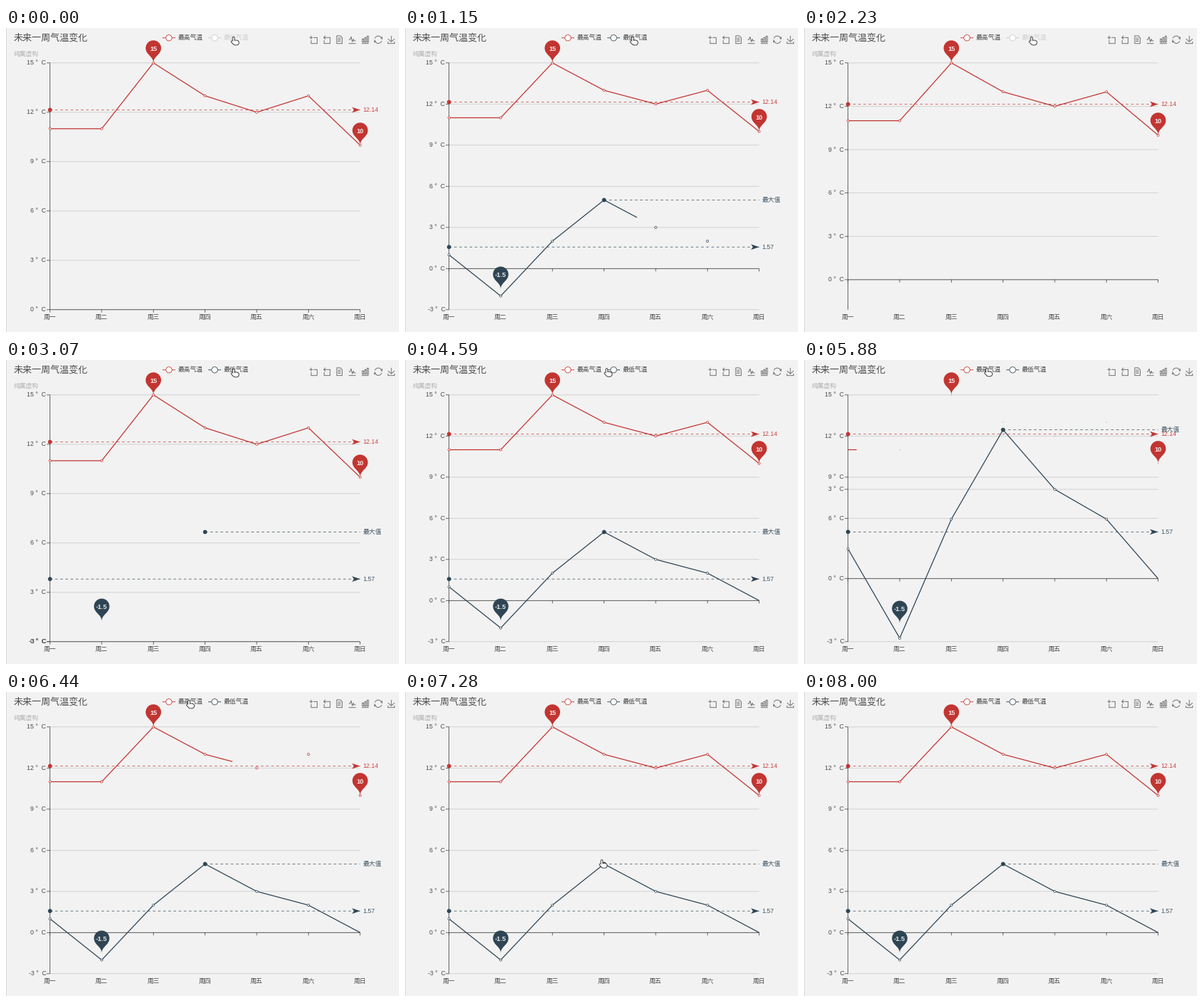
Write a matplotlib script that moves like this. It is 550x425 px and loops after 8.15 s.

```python
import math

import matplotlib.pyplot as plt
import numpy as np
from matplotlib.animation import FuncAnimation
from matplotlib.patches import Circle, Polygon

W, H = 550, 425
LOOP, STEP = 8150, 50
PT = 0.72                      # points per pixel at 100 dpi
BG, INK, RED, NAVY = "#f2f2f2", "#333333", "#c23531", "#2f4554"
OFF, GRID = "#cccccc", "#cccccc"
LEFT, RIGHT, TOP, BOTTOM = 61.6, 495.6, 48.8, 393.8
XS = np.linspace(LEFT, RIGHT, 7)

plt.rcParams["font.family"] = ["Liberation Sans", "Noto Sans CJK JP"]
plt.rcParams["lines.scale_dashes"] = False

# Pins are (column, value)
SERIES = {
    "high": dict(color=RED, data=[11, 11, 15, 13, 12, 13, 10],
                 pins=[(2, 15), (6, 10)], lx=228, name="最高气温"),
    "low": dict(color=NAVY, data=[1, -2, 2, 5, 3, 2, 0],
                pins=[(1, -1.5)], lx=292, name="最低气温"),
}

# Legend clicks: first picture after the click, ms already elapsed, series
CLICKS = [(630, 46, "low"), (2140, 30, "low"), (3070, 0, "low"),
          (5140, 40, "high"), (5880, 28, "high")]

# Pointer: on the second legend item, on the first one, leaving
HAND_A, HAND_B, HAND_C = map(np.array, ((315.5, 12.5), (253, 11.5), (285, 380)))

fig = plt.figure(figsize=(W / 100, H / 100), dpi=100, facecolor=BG)
ax = fig.add_axes([0, 0, 1, 1])
ax.set_xlim(0, W)
ax.set_ylim(H, 0)
ax.axis("off")
drawn = []


def line(points, color, width, dash=None, cap="butt"):
    xs, ys = np.array(points, float).T
    drawn.extend(ax.plot(xs, ys, color=color, lw=width * PT, zorder=1,
                         ls=(0, dash) if dash else "-", snap=False,
                         solid_capstyle=cap, dash_capstyle=cap))


def text(x, y, s, color=INK, size=8.75, ha="left", weight="normal"):
    drawn.append(ax.text(x, y, s, color=color, fontsize=size * PT, ha=ha,
                         va="center", weight=weight, alpha=0.88, zorder=1))


def disc(x, y, r, fill, edge="none", width=0):
    drawn.append(ax.add_patch(Circle((x, y), r, fc=fill, ec=edge,
                                     lw=width * PT, zorder=1)))


def shape(points, fill):
    drawn.append(ax.add_patch(Polygon(points, fc=fill, ec="none", zorder=1)))


def pin_outline(r=10.8, height=36.1):
    """Map pin with its tip at the origin: a round head and two curved sides."""
    dy = r * r / (height - r)
    cy = dy + r - height
    ang = math.asin(dy / r)
    a = np.linspace(math.pi - ang, 2 * math.pi + ang, 40)
    head = np.column_stack([r * np.cos(a), cy + r * np.sin(a)])
    x0, y0 = head[-1]
    x1, y1 = x0 - 0.6 * r * math.sin(ang), y0 + 0.6 * r * math.cos(ang)
    t = np.linspace(0, 1, 14)
    u = 1 - t
    side = np.column_stack([
        u ** 3 * x0 + 3 * u * u * t * x1,
        u ** 3 * y0 + 3 * u * u * t * y1 - 3 * u * t * t * 0.7 * r])
    return np.vstack([head, side, side[::-1] * (-1, 1)])


PIN = pin_outline()


def toolbox():
    """Seven outline icons, each designed on a square from -1 to 1."""
    def box(x, y, w, h):
        return [(x, y), (x + w, y), (x + w, y + h), (x, y + h), (x, y)]

    def row(y, half=0.9):
        return [(-half, y), (half, y)]

    frame = [(0.1, -0.55), (1, -0.55), (1, 1), (-0.55, 1), (-0.55, 0.1)]
    zoom = [frame, [(-1, -0.55), (-0.1, -0.55)], [(-0.55, -1), (-0.55, -0.1)]]
    back = [frame, [(-0.6, -0.55), (0.1, -0.55)],
            [(-0.2, -1), (-0.65, -0.55), (-0.2, -0.1)]]
    page = [[(0.3, -1), (0.75, -0.5), (0.75, 1), (-0.65, 1), (-0.65, -1), (0.3, -1)]]
    page += [row(y, 0.4) for y in (-0.4, 0, 0.4)]
    pulse = [[(-0.9, 0), (-0.6, 0), (-0.3, -0.75), (0, 0.55), (0.3, -0.15),
              (0.4, 0.3), (0.9, 0.3)], row(1)]
    bars = [box(-0.77 + 0.62 * i, -0.2 - 0.36 * i, 0.35, 0.85 + 0.36 * i)
            for i in range(3)] + [row(1)]
    a = np.linspace(0.12, 1, 20) * math.pi
    half = np.column_stack([np.cos(a), np.sin(a)]) * 0.95
    tick = np.array([(0.6, 0.4), (1, 0.4), (1, 0.75)]) * (-1, 1)
    reload = [half, -half, tick, -tick]
    save = [[(-0.85, -0.2), (0, 0.55), (0.85, -0.2)], [(0, 0.5), (0, -1)],
            [(-0.85, 0.5), (-0.85, 1), (0.85, 1), (0.85, 0.5)]]

    for i, icon in enumerate((zoom, back, page, pulse, bars, reload, save)):
        for stroke in icon:
            line(np.array(stroke) * 5.4 + (430 + 18.2 * i, 16.3), "#666666", 0.9)


def axis_for(shown):
    """Rounded range that holds zero and all visible values."""
    values = [0] + [v for key in shown for v in SERIES[key]["data"]]
    lo, hi = min(values), max(values)
    step = round((hi - lo) / 5)
    return math.floor(lo / step) * step, math.ceil(hi / step) * step, step


def scale(axis, v):
    lo, hi, _ = axis
    return BOTTOM - (np.asarray(v, float) - lo) * (BOTTOM - TOP) / (hi - lo)


def ticks(axis):
    return range(axis[0], axis[1] + 1, axis[2])


def draw_axes(old, new, slide):
    """Ticks shared by both ranges slide; the others sit at their new place."""
    marks = {v: float(slide(v) if v in ticks(old) else scale(new, v))
             for v in ticks(new)}
    for y in marks.values():
        line([(LEFT, y), (RIGHT, y)], GRID, 0.85)
    for v, y in marks.items():
        line([(LEFT - 4.5, y), (LEFT, y)], INK, 0.72)
        text(56.3, y, f"{v} °  C", ha="right")
    line([(LEFT, TOP), (LEFT, BOTTOM)], INK, 0.72)
    zero = marks[0]
    line([(LEFT, zero), (RIGHT, zero)], INK, 0.72)
    for x in XS:
        line([(x, zero), (x, zero + 4)], INK, 0.72)


def draw_curve(s, to_y, reveal, grow):
    ys = to_y(s["data"])
    front = LEFT + (RIGHT - LEFT) * reveal
    if reveal > 0:
        seen = [(x, y) for x, y in zip(XS, ys) if x < front]
        line(seen + [(front, np.interp(front, XS, ys))], s["color"], 1.25)
    if grow > 0:
        for x, y, v in zip(XS, ys, s["data"]):
            if v:  # no dot on the zero line
                disc(x, y, 1.5 * grow, "white", s["color"], 0.75)


def mark_line(x, y, color, label):
    line([(x, y), (RIGHT, y)], color, 0.7, (3.6 * PT, 3.6 * PT))
    disc(x, y, 2.9, color)
    text(499.3, y, label, color)


def draw_marks(s, to_y):
    color, data = s["color"], s["data"]
    mean = sum(data) / len(data)
    y = float(to_y(mean))
    mark_line(LEFT, y, color, f"{mean:.2f}")
    shape([(RIGHT, y), (RIGHT - 11.5, y - 3.9), (RIGHT - 8.6, y),
           (RIGHT - 11.5, y + 3.9)], color)
    if s is SERIES["low"]:
        top = max(data)
        mark_line(XS[data.index(top)], float(to_y(top)), color, "最大值")
    for col, v in s["pins"]:
        tip = float(to_y(v))
        shape(PIN + (XS[col], tip), color)
        text(XS[col], tip - 19.2, str(v), "white", 9.2, "center", "bold")


def draw_legend(shown):
    for key, s in SERIES.items():
        on = key in shown
        color, x = s["color"] if on else OFF, s["lx"]
        line([(x - 9, 13.8), (x + 9, 13.8)], color, 0.9)
        disc(x, 13.8, 4.2, "white", color, 0.8)
        text(x + 12.3, 13.8, s["name"], INK if on else OFF)


def progress(t, start, end):
    return min(max((t - start) / (end - start), 0), 1)


def ease_out(q):
    return 1 - (1 - q) ** 3


def draw_hand(t):
    if t > 7500:
        return
    at = (HAND_A + (HAND_B - HAND_A) * ease_out(progress(t, 4500, 4880))
          + (HAND_C - HAND_B) * progress(t, 6980, 7500))
    finger = [(3, 1.2), (3, 7)], 1.9
    palm = [(5.2, 8), (7.2, 8)], 6
    thumb = [(0.9, 6.6), (4, 9.5)], 1.8
    for color, rim in (("#222222", 1.7), ("white", 0)):
        for stroke, width in (finger, palm, thumb):
            line(at + stroke, color, width + rim, cap="round")


def held(dt):
    """Pictures last 140 ms at first and 95 ms later on."""
    return dt // 140 * 140 if dt < 560 else 560 + (dt - 560) // 95 * 95


def draw(k):
    for artist in drawn:
        artist.remove()
    drawn.clear()

    t = (k + 1) * STEP - 5
    before = shown = ("high",)
    age = LOOP
    for start, lead, name in CLICKS:
        if start <= t:
            before = shown
            shown = tuple(s for s in SERIES if (s in before) != (s == name))
            age = lead + held(t - start)
    old, new = axis_for(before), axis_for(shown)
    ease = ease_out(progress(age, 0, 300))

    def slide(v):
        return scale(old, v) + (scale(new, v) - scale(old, v)) * ease

    def settled(v):
        return scale(new, v)

    draw_axes(old, new, slide)
    for key in shown:
        if key in before:
            draw_curve(SERIES[key], slide, 1, 1)
        else:
            draw_curve(SERIES[key], settled, progress(age, 0, 1000),
                       progress(age, 0, 300))
    for key in shown:
        draw_marks(SERIES[key], slide if key in before else settled)
    draw_legend(shown)
    draw_hand(t)


line([(0.5, 0), (0.5, H)], "#dcdcdc", 1)
text(11, 13.8, "未来一周气温变化", size=13)
text(11, 36, "纯属虚构", "#aaaaaa")
for x, day in zip(XS, "一二三四五六日"):
    text(x, 404.7, "周" + day, ha="center")
toolbox()
drawn.clear()  # everything so far stays on screen

anim = FuncAnimation(fig, draw, frames=LOOP // STEP, interval=STEP,
                     repeat=True, cache_frame_data=False)
plt.show()
```
